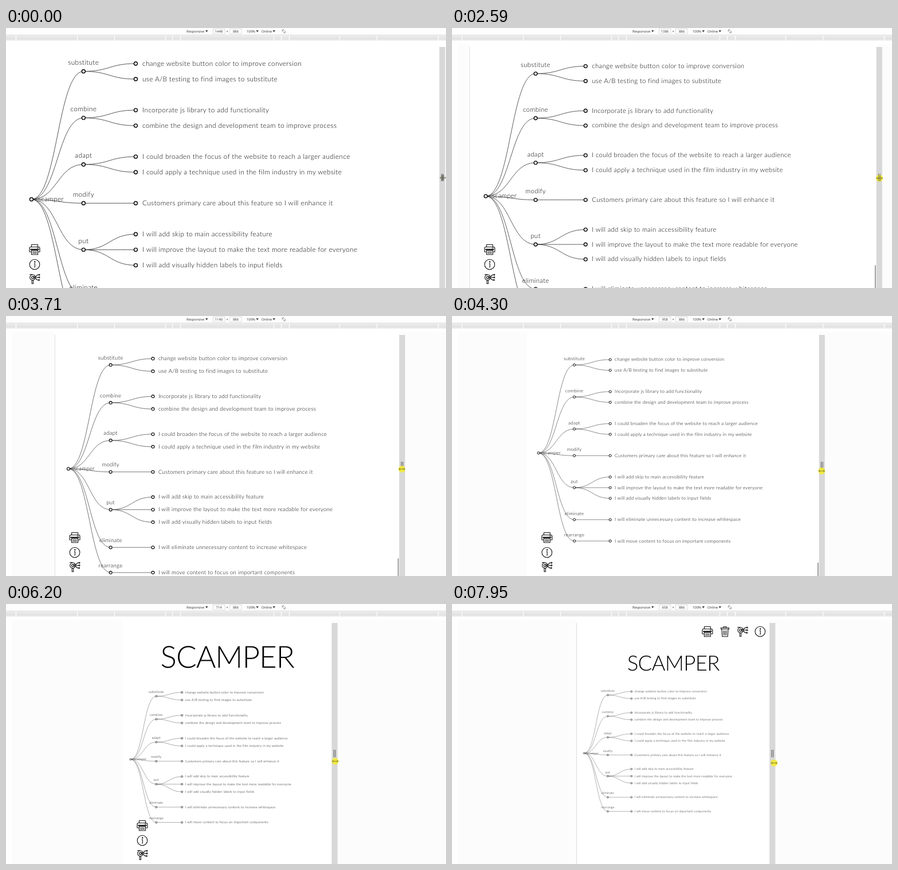
Recreate the animation shown at these times as an HTML page. Size 768 by 453 pixels, loop 8000 ms.

```html
<!DOCTYPE html>
<html lang="en">
<head>
<meta charset="utf-8">
<title>Responsive mind map</title>
<style>
  html, body { margin: 0; width: 100%; height: 100%; overflow: hidden; background: #fff; }
  svg { display: block; width: 768px; height: 453px; }
  text { text-rendering: geometricPrecision; }
  .bar text { font: 5.9px "Open Sans", sans-serif; fill: #333; }
  #tree text { font: 300 11.8px Lato, sans-serif; letter-spacing: .03em; fill: #000; }
  #tree path { fill: none; stroke: #2a2a2a; stroke-width: .8; }
  #tree circle { fill: #fff; stroke: #000; stroke-width: 1.4; }
  #title { font-family: Lato, sans-serif; font-weight: 300; letter-spacing: -.02em; fill: #000; text-anchor: middle; }
  .icon { fill: none; stroke: #111; stroke-width: 1.1; stroke-linejoin: round; stroke-linecap: round; }
  .icon .solid { fill: #111; }
  .mid { text-anchor: middle; }
</style>
</head>
<body>
<svg viewBox="0 0 768 453">
  <defs>
    <clipPath id="view"><rect y="33" width="768" height="420"/></clipPath>
    <g id="printer" class="icon">
      <path d="M-5.5-4.5v-4h11v4M-6.5-4.5h13q2.5 0 2.5 2.5v6h-3.5M-6.5-4.5q-2.5 0-2.5 2.5v6h3.5M-5.5 1.5h11v7.2h-11zM-3.5 4h7M-3.5 6.300h7"/>
      <path class="solid" d="M-7-.8h14v1h-14z"/>
      <path d="M4.5-2.7h2"/>
    </g>
    <g id="info" class="icon">
      <circle r="8.8"/>
      <path d="M-.8-1.5h1.200v6.300h-.8"/>
      <circle class="solid" cx=".3" cy="-4.500" r=".7"/>
    </g>
    <g id="search" class="icon">
      <circle cx="-3.500" cy="-2.500" r="4.800"/>
      <circle cx="-3.500" cy="-2.500" r="2"/>
      <path d="M-4.800 2.500h2.300v6h-2.300zM-8.500-7.500h5M-3-4h5l3-3h2M-2-2.500h9M-2-1l4 .5 2.500 2.500h2"/>
      <circle cx="8" cy="-7" r="1"/><circle cx="8" cy="-2.500" r="1"/><circle cx="7.500" cy="2" r="1"/>
    </g>
    <g id="trash" class="icon">
      <path d="M-7-6.500h14v2.300h-14zM-2.500-6.500v-2h5v2M-5.700-4.200l1 13h9.400l1-13M-2.700-1.500l.3 7.500M0-1.500v7.500M2.700-1.500l-.3 7.500"/>
    </g>
  </defs>

  <g id="shade" fill="#fcfcfc">
    <rect id="shadeL" x="10" y="28" height="425"/>
    <rect id="shadeR" y="28" height="425"/>
  </g>
  <rect id="edge" y="33" width=".8" height="420" fill="#d6d6d6"/>

  <g clip-path="url(#view)">
    <text id="title">SCAMPER</text>
    <g id="tree"></g>
    <g id="side">
      <use href="#printer" y="386"/><use href="#info" y="412"/><use href="#search" y="437"/>
    </g>
    <g id="menu">
      <use href="#printer" x="-108.300" y="48"/><use href="#trash" x="-77.700" y="48"/>
      <use href="#search" x="-47" y="48"/><use href="#info" x="-16.300" y="48"/>
    </g>
    <rect id="thumb" width="1.600" height="60" fill="#8a8a8a"/>
  </g>

  <g id="grip">
    <rect y="33" width="10.200" height="420" fill="#d8d8d8"/>
    <path d="M3.800 254v13M6.400 254v13" stroke="#555" stroke-width="1"/>
  </g>
  <g id="cursor">
    <circle id="glow" r="6" fill="#f3ea35" opacity=".9"/>
    <path d="M-5 0h10M-3.200-1.800l-1.800 1.800 1.800 1.800M3.200-1.800l1.800 1.800-1.800 1.800" fill="none" stroke="#55521c" stroke-width=".7"/>
    <path id="split" d="M-1.200-5v10M1.200-5v10" stroke="#444" stroke-width=".8"/>
  </g>

  <g class="bar">
    <rect width="768" height="12" fill="#fdfdfd"/>
    <path d="M0 12.500h768" stroke="#cfcfcf"/>
    <g fill="#fff" stroke="#d4d4d4" stroke-width=".8">
      <rect x="361.500" y="1.500" width="20.500" height="8.500"/><rect x="390.500" y="1.500" width="20.500" height="8.500"/>
    </g>
    <text x="315" y="8">Responsive</text>
    <text x="371.500" y="8" class="mid" id="label"></text>
    <text x="386.200" y="8.300" class="mid">×</text>
    <text x="401" y="8" class="mid">886</text>
    <text x="420" y="8">100%</text>
    <text x="446" y="8">Online</text>
    <path d="M348 4h4.400l-2.200 3.600zM436.500 4h4.400l-2.200 3.600zM465.500 4h4.400l-2.200 3.600z" fill="#444"/>
    <g fill="none" stroke="#777" stroke-width=".7">
      <rect x="-1.500" y="-2.400" width="3" height="4.800" rx=".5" transform="translate(484.800 5.700) rotate(-45)"/>
      <path d="M481.600 5a3.300 3.300 0 0 1 3-2.700M488 6.400a3.300 3.300 0 0 1-3 2.700"/>
    </g>
    <rect y="14" width="768" height="7.700" fill="#e5e5e5"/>
    <path id="ticks" stroke="#fff" stroke-width="1.300"/>
  </g>
</svg>
<script>
const $ = id => document.getElementById(id);
const set = (id, attrs) => { for (const k in attrs) $(id).setAttribute(k, attrs[k]); };
const show = (id, on) => set(id, { visibility: on ? 'visible' : 'hidden' });

const LOOP = 8000, CENTER = 385.7, SCALE = .512, BASE = 741.4;
const NARROW_AT = 6950, DRAG_AT = 2070;

// The tree is laid out once at the widest size, then scaled with the page.
const ROW = 27.03, COLS = [29.4, 120.3, 211.4];
const branches = [
  ['substitute', 0, ['change website button color to improve conversion', 'use A/B testing to find images to substitute']],
  ['combine', 3, ['Incorporate js library to add functionality', 'combine the design and development team to improve process']],
  ['adapt', 6, ['I could broaden the focus of the website to reach a larger audience', 'I could apply a technique used in the film industry in my website']],
  ['modify', 9, ['Customers primary care about this feature so I will enhance it']],
  ['put', 11, ['I will add skip to main accessibility feature', 'I will improve the layout to make the text more readable for everyone', 'I will add visually hidden labels to input fields']],
  ['eliminate', 15, ['I will eliminate unnecessary content to increase whitespace']],
  ['rearrange', 17, ['I will move content to focus on important components']]
];

function buildTree() {
  let links = '', nodes = '', labels = '';
  const link = (c, y0, y1) => {
    const [a, b] = [COLS[c], COLS[c + 1]], m = (a + b) / 2;
    links += `<path d="M${a} ${y0}C${m} ${y0} ${m} ${y1} ${b} ${y1}"/>`;
  };
  const node = (c, y, text, dx, dy, cls = '') => {
    nodes += `<circle cx="${COLS[c]}" cy="${y}" r="3"/>`;
    labels += `<text x="${COLS[c] + dx}" y="${y + dy}" class="${cls}">${text}</text>`;
  };
  const rootY = 8.75 * ROW;
  node(0, rootY, 'scamper', 11.5, 3.6);
  for (const [name, row, leaves] of branches) {
    const y = (row + (leaves.length - 1) / 2) * ROW;
    link(0, rootY, y);
    node(1, y, name, 0, -11.6, 'mid');
    leaves.forEach((leaf, i) => {
      const leafY = (row + i) * ROW;
      link(1, y, leafY);
      node(2, leafY, leaf, 11.6, 3.6);
    });
  }
  $('tree').innerHTML = links + nodes + labels;
}

// time, page width, shown width, first row y, cursor offset, cursor y
const keys = [
  [0, 1448, 1448, 62, 1, 261],
  [2069, 1448, 1448, 62, 1, 261],
  [2070, 1446, 1446, 62.5, 1, 261],
  [2850, 1357, 1357, 68.5, 0, 262],
  [3120, 1302, 1302, 72, -.5, 263],
  [3750, 1166, 1130, 74.5, -.5, 267],
  [4300, 996, 958, 76, -.5, 270],
  [4620, 954, 900, 81, -1.5, 270.5],
  [5080, 848, 818, 90.5, -2.5, 271],
  [5420, 807, 788, 111, 0, 272],
  [6200, 714, 714, 154, 1, 274],
  [6990, 698, 698, 153.6, 2, 275],
  [7270, 696, 696, 153.5, 2, 275],
  [7950, 658, 658, 152.5, 3, 277],
  [8000, 658, 658, 152.5, 3, 277]
];

function sample(t) {
  const i = keys.findIndex(k => k[0] > t);
  const a = keys[i - 1], b = keys[i], f = (t - a[0]) / (b[0] - a[0]);
  return a.slice(1).map((v, j) => v + (b[j + 1] - v) * f);
}

function draw(t) {
  const [css, shown, rowY, dx, cursorY] = sample(t);
  const w = css * SCALE, left = CENTER - w / 2, right = CENTER + w / 2;
  const dragging = t >= DRAG_AT, narrow = t >= NARROW_AT;

  $('label').textContent = Math.round(shown / 2) * 2;
  set('tree', { transform: `translate(${left} ${rowY}) scale(${w / BASE})` });
  set('title', {
    x: 386.2,
    y: narrow ? 115.6 : rowY - 43.5 - (w - 366) * .05,
    'font-size': narrow ? 36.6 : 53
  });

  set('side', { transform: `translate(${left + 35} 0)` });
  set('menu', { transform: `translate(${right} 0)` });
  show('side', !narrow);
  show('menu', narrow);

  show('shade', dragging);
  set('shadeL', { width: Math.max(0, left - 10) });
  set('shadeR', { x: right, width: 768 - right });
  show('edge', dragging && (w > 600 || narrow));
  set('edge', { x: left - .2 });
  show('thumb', dragging && t < 4620);
  set('thumb', { x: right - 2.6, y: 411 + (740 - w) * .082 });

  set('grip', { transform: `translate(${right} 0)` });
  set('cursor', { transform: `translate(${right + 5.1 + dx} ${cursorY})` });
  show('glow', t >= 600);
  show('split', t < 2850);
}

buildTree();
set('ticks', {
  d: [17, 124, 189, 278, 290, 304, 467, 480, 494, 582, 647, 754].map(x => `M${x + .5} 14v7.7`).join('')
});
const start = performance.now();
function frame() {
  draw((performance.now() - start) % LOOP);
  requestAnimationFrame(frame);
}
draw(0);
requestAnimationFrame(frame);
</script>
</body>
</html>
```
